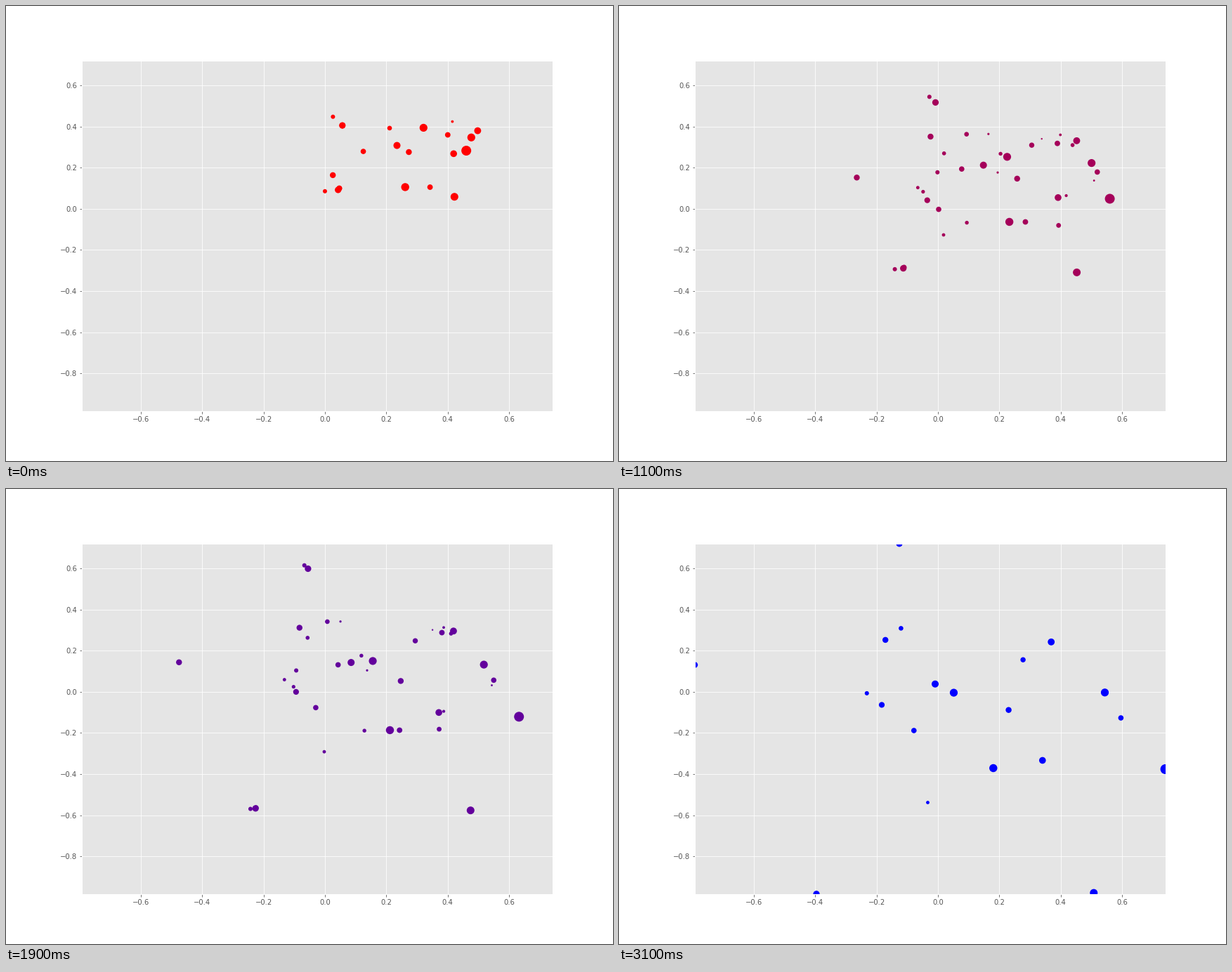
A matplotlib script that plays this animation: 864x648 px, repeating every 3200 ms.

```python
import numpy as np
import matplotlib.pyplot as plt
from matplotlib.animation import FuncAnimation

FRAMES, INTERVAL = 32, 100
EDGE = 1.5
RED, BLUE = np.array([1.0, 0, 0]), np.array([0, 0, 1.0])

plt.rcParams.update({
    "font.family": "DejaVu Sans", "font.size": 10,
    "axes.facecolor": "#E5E5E5", "axes.edgecolor": "white",
    "axes.linewidth": 1, "axes.grid": True, "axes.axisbelow": True,
    "grid.color": "white", "grid.linestyle": "-", "grid.linewidth": 0.8,
    "xtick.color": "#555555", "ytick.color": "#555555",
})

starts = np.array([
    (.0263, .4479), (.0570, .4056), (.2109, .3926), (.3214, .3943),
    (.4155, .4244), (.4004, .3598), (.4771, .3472), (.4979, .3800),
    (.4608, .2830), (.4196, .2683), (.2736, .2762), (.2349, .3083),
    (.1252, .2793), (.0259, .1639), (.0002, .0857), (.0430, .0922),
    (.0469, .0997), (.2617, .1058), (.3427, .1055), (.4222, .0587),
])

ends = np.array([
    (-.1257, .7209), (-.1710, .2526), (-.1202, .3090), (-.7919, .1311),
    (-.2315, -.0068), (-.1829, -.0632), (-.0781, -.1881), (-.0330, -.5381),
    (-.0089, .0382), (.0517, -.0041), (.1806, -.3708), (.3409, -.3332),
    (.2305, -.0881), (.2775, .1560), (.3693, .2427), (.5440, -.0031),
    (.5964, -.1267), (.7411, -.3759), (.5080, -.9774), (-.3958, -.9827),
])

# Transport plan: start index, end index, dot radius in pixels
plan = [
    (0, 0, 3.0), (1, 0, 4.6), (1, 1, 4.2), (12, 1, 2.8), (2, 2, 3.3),
    (3, 2, 1.6), (13, 3, 4.2), (12, 4, 3.0), (13, 4, 2.4), (13, 5, 2.6),
    (16, 5, 4.1), (16, 6, 3.8), (16, 7, 2.4), (14, 19, 3.0), (15, 19, 4.6),
    (16, 19, 3.7), (12, 8, 3.8), (11, 8, 5.0), (3, 8, 2.7), (3, 9, 5.6),
    (10, 9, 1.6), (10, 12, 4.2), (3, 13, 3.7), (3, 14, 1.2), (4, 14, 1.9),
    (5, 14, 3.9), (7, 14, 4.9), (6, 14, 2.8), (6, 15, 5.6), (6, 16, 3.8),
    (8, 16, 1.4), (8, 17, 7.0), (9, 11, 4.8), (8, 11, 2.1), (19, 11, 3.4),
    (16, 10, 2.7), (17, 10, 5.7), (18, 10, 3.9), (19, 18, 5.5),
]
src, dst, radius = (np.array(col) for col in zip(*plan))

fig, ax = plt.subplots(figsize=(12, 9), dpi=72)
ax.set_xlim(ends[:, 0].min(), ends[:, 0].max())
ax.set_ylim(ends[:, 1].min(), ends[:, 1].max())
dots = ax.scatter(*starts[src].T, s=(2 * radius - EDGE) ** 2,
                  color=[RED], linewidths=EDGE)


def draw(i):
    t = i / (FRAMES - 1)
    dots.set_offsets((1 - t) * starts[src] + t * ends[dst])
    dots.set_color([(1 - t) * RED + t * BLUE])
    return dots,


anim = FuncAnimation(fig, draw, frames=FRAMES, interval=INTERVAL,
                     repeat=True, repeat_delay=0)
plt.show()
```
